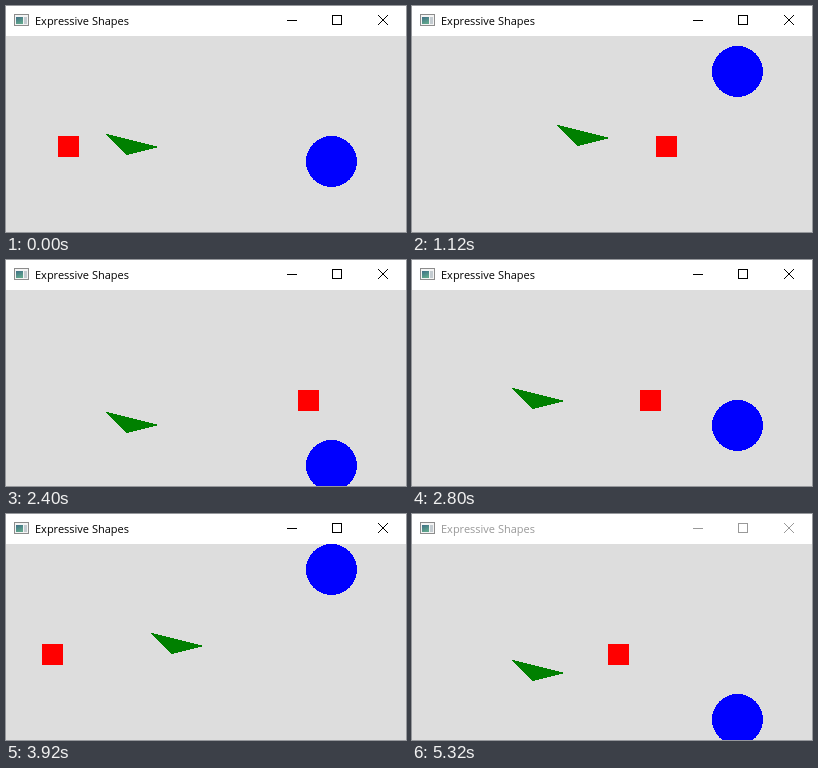
Animation of 400x226 px, one loop 5.4 s. Source, as an HTML page:

```html
<!DOCTYPE html>
<html lang="en">
<head>
<meta charset="utf-8">
<title>Expressive Shapes</title>
<style>
  html, body { margin: 0; width: 100%; height: 100%; overflow: hidden; background: #fff; }
  svg { display: block; width: 400px; height: 226px; }
  .chrome { --ink: #000; }
  .chrome.idle { --ink: #999; }
  .chrome text { font: 11px "Open Sans", "Noto Sans", sans-serif; fill: var(--ink); }
  .chrome path { fill: none; stroke: var(--ink); }
  .crisp { shape-rendering: crispEdges; }
</style>
</head>
<body>
<svg viewBox="0 0 400 226">
  <defs>
    <linearGradient id="pane" x2="0.4" y2="1">
      <stop offset="0" stop-color="#3f6f86"/>
      <stop offset="1" stop-color="#5fa58c"/>
    </linearGradient>
  </defs>
  <rect width="400" height="226" fill="#fff"/>
  <g class="crisp">
    <rect x="8.5" y="8.5" width="14" height="11" fill="#f4f4f4" stroke="#8c8c8c"/>
    <rect x="10" y="11" width="7" height="7" fill="url(#pane)"/>
    <rect x="18" y="11" width="3" height="7" fill="#c3cbd0"/>
  </g>
  <g class="chrome" id="chrome">
    <text x="29" y="19">Expressive Shapes</text>
    <path class="crisp" d="M281 14.5h10M326.5 9.5h9v9h-9z"/>
    <path d="M372 9l10 10M382 9l-10 10"/>
  </g>
  <g class="crisp">
    <rect y="30" width="400" height="196" fill="#ddd"/>
    <rect id="square" y="130" width="21" height="21" fill="#f00"/>
    <path id="wedge" d="M.5 .5L20.5 20.5L50.5 13z" fill="#008000" stroke="#008000" stroke-linejoin="round"/>
    <circle id="ball" cx="325.5" r="25.5" fill="#00f"/>
  </g>
</svg>
<script>
  const LOOP = 5400;
  const LAST = 53;
  const CATCH_UP = [3, 18, 34, 48]; // pictures that advance by two ticks
  const [chrome, square, wedge, ball] =
    ["chrome", "square", "wedge", "ball"].map(id => document.getElementById(id));

  // Pictures alternate between 120 ms and 80 ms.
  const pictureAt = ms => 2 * Math.floor(ms / 200) + (ms % 200 >= 120 ? 1 : 0);

  // Travel back and forth over a span.
  const bounce = (way, span) => span - Math.abs(span - way % (2 * span));

  // Clockwise position on a square track, from its top left corner.
  function track(way, side) {
    const d = way % (4 * side);
    const rest = d % side;
    return [[rest, 0], [side, rest], [side - rest, side], [0, side - rest]][Math.floor(d / side)];
  }

  function draw(picture) {
    const tick = picture + CATCH_UP.filter(p => p <= picture).length;
    const [x, y] = track(162 + 6 * tick, 45);
    square.setAttribute("x", bounce(56 + 16 * tick, 384) - 4);
    ball.setAttribute("cy", bounce(205 + 10 * tick, 155) + 50.5);
    wedge.setAttribute("transform", `translate(${100 + x} ${110 + y})`);
    chrome.classList.toggle("idle", picture === LAST);
  }

  function loop() {
    draw(pictureAt(performance.now() % LOOP));
    requestAnimationFrame(loop);
  }
  loop();
</script>
</body>
</html>
```
